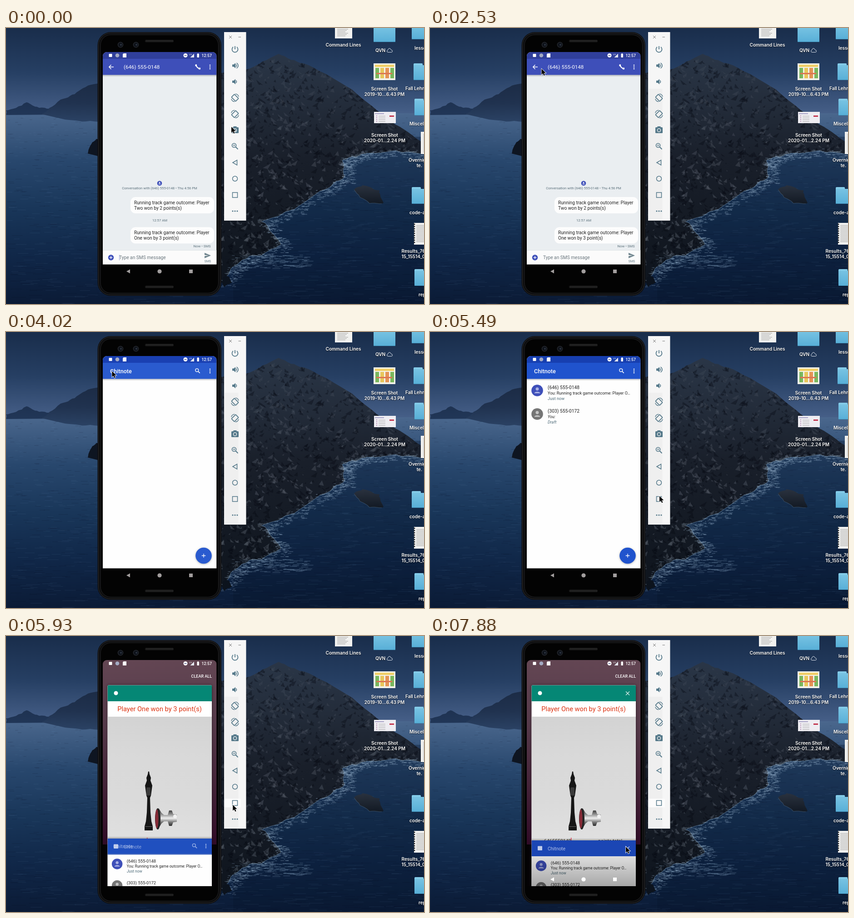
An HTML page with a canvas for the animation above (8 s loop, 920 by 609 pixels).

```html
<!DOCTYPE html>
<html lang="en">
<head>
<meta charset="utf-8">
<title>Phone on a desktop</title>
<style>
html, body { margin: 0; width: 100%; height: 100%; overflow: hidden; background: #0c1f3c; }
canvas { display: block; }
</style>
</head>
<body>
<canvas id="stage" width="920" height="609"></canvas>
<script>
const W = 920, H = 609, LOOP = 8000;
const PHONE_A = '(646) 555-0148', PHONE_B = '(303) 555-0172', APP = 'Chitnote';
const ROBOTO = 'Roboto, sans-serif', LABEL = 'Inter, sans-serif';
const stage = document.getElementById('stage').getContext('2d');
let c = stage;

// ---------- drawing helpers ----------
function rect(x, y, w, h, fill) { c.fillStyle = fill; c.fillRect(x, y, w, h); }
function round(x, y, w, h, r, fill) {
  c.beginPath(); c.roundRect(x, y, w, h, r); c.fillStyle = fill; c.fill();
}
function frame(x, y, w, h, r, color, width = 1) {
  c.beginPath(); c.roundRect(x, y, w, h, r); c.strokeStyle = color; c.lineWidth = width; c.stroke();
}
function disc(x, y, r, fill) { oval(x, y, r, r, fill); }
function oval(x, y, rx, ry, fill) {
  c.beginPath(); c.ellipse(x, y, rx, ry, 0, 0, 7); c.fillStyle = fill; c.fill();
}
function trace(points, closed) {
  c.beginPath();
  for (const [x, y] of points) c.lineTo(x, y);
  if (closed) c.closePath();
}
function poly(points, fill) { trace(points, true); c.fillStyle = fill; c.fill(); }
function line(points, color, width = 1, closed = false) {
  trace(points, closed); c.strokeStyle = color; c.lineWidth = width; c.stroke();
}
function ring(x, y, r, color, width = 1, from = 0, to = 2 * Math.PI) {
  c.beginPath(); c.arc(x, y, r, from, to); c.strokeStyle = color; c.lineWidth = width; c.stroke();
}
function cross(x, y, r, color, width = 1) {
  line([[x - r, y - r], [x + r, y + r]], color, width);
  line([[x + r, y - r], [x - r, y + r]], color, width);
}
function plus(x, y, r, color, width = 1.3) {
  line([[x - r, y], [x + r, y]], color, width);
  line([[x, y - r], [x, y + r]], color, width);
}
function text(s, x, y, size, fill, { align = 'left', font = ROBOTO, style = '' } = {}) {
  c.font = `${style} ${size}px ${font}`;
  c.textAlign = align; c.fillStyle = fill; c.fillText(s, x, y);
}
function fade(y0, y1, ...stops) {
  const g = c.createLinearGradient(0, y0, 0, y1);
  stops.forEach((s, i) => g.addColorStop(i / (stops.length - 1), s));
  return g;
}
function shadowed(color, blur, dy, draw) {
  c.save();
  c.shadowColor = color; c.shadowBlur = blur; c.shadowOffsetY = dy;
  draw();
  c.restore();
}
function clipped(x, y, w, h, r, draw) {
  c.save(); c.beginPath(); c.roundRect(x, y, w, h, r); c.clip(); draw(); c.restore();
}

// ---------- landscape ----------
let seed = 71;
function rnd(from = 0, to = 1) {
  seed = (seed * 16807) % 2147483647;
  return from + (to - from) * seed / 2147483647;
}
// Splits every edge and nudges the middle, for a natural outline.
function rough(points, amount, depth = 3) {
  if (!depth) return points;
  const out = [points[0]];
  for (let i = 1; i < points.length; i++) {
    const [[x0, y0], [x1, y1]] = [points[i - 1], points[i]];
    out.push([(x0 + x1) / 2 + rnd(-amount, amount), (y0 + y1) / 2 + rnd(-amount, amount)], points[i]);
  }
  return rough(out, amount / 2, depth - 1);
}
function hill(points, ...colors) {
  poly(rough(points, 4), fade(125, 205, ...colors));
}
function wallpaper() {
  rect(0, 0, W, 195, fade(0, 195, '#192d4b', '#263f63', '#48618a'));
  rect(0, 188, W, H - 188, fade(188, H, '#4a678d', '#28476d', '#193659', '#102748', '#0b1b36'));
  rect(500, 240, 420, 369, 'rgba(7,20,45,.35)');
  for (let i = 0; i < 1800; i++) {
    const y = rnd(195, H), length = rnd(1, 2) * (3 + (y - 180) / 30);
    rect(rnd(0, W), y, length, 1, rnd() < .5 ? 'rgba(120,155,195,.1)' : 'rgba(2,10,28,.16)');
  }
  hill([[0, 192], [0, 182], [45, 164], [85, 176], [118, 191]], '#1b2d49', '#22385a');
  hill([[78, 190], [120, 158], [160, 139], [205, 122], [205, 207], [130, 202]], '#1c2c46', '#20324f', '#2a4163');
  poly(rough([[180, 277], [190, 252], [204, 242], [204, 283]], 3), '#0e1521');

  const ridge = rough([[460, 100], [528, 92], [600, 57], [655, 78], [762, 136], [850, 208], [920, 256]], 5);
  const shore = rough([[920, 279], [795, 276], [742, 291], [746, 327], [690, 361], [563, 427], [606, 477], [520, 512], [480, 560]], 9);
  c.save();
  trace([...ridge, ...shore, [460, 560]], true);
  c.fillStyle = fade(55, 520, '#2a3647', '#232c3a', '#191f2a', '#151b25', '#10161f');
  c.fill();
  c.clip();
  for (let i = 0; i < 2200; i++) {
    const x = rnd(470, W), y = rnd(65, 560), size = rnd(2, 13), lean = rnd(-size, size);
    const rocky = Math.min(.34, .06 + y / 1300);
    poly([[x, y], [x + lean + size * .4, y + size], [x + lean - size * .5, y + size * .8]],
      rnd() < .62 ? 'rgba(4,8,15,.34)' : `rgba(104,111,124,${rocky})`);
  }
  c.restore();

  // surf along the shore
  c.lineJoin = 'round';
  line(shore, 'rgba(125,158,190,.35)', 2);
  for (const [x, y] of shore) {
    for (let j = 0; j < 14; j++) rect(x + rnd(-9, 22), y + rnd(-5, 11), rnd(2, 9), 1.3, 'rgba(160,188,212,.33)');
  }
  for (let i = 0; i < 110; i++) rect(rnd(495, 660), rnd(500, 530), rnd(5, 19), 1.4, 'rgba(150,182,210,.25)');
  const rock = rough([[766, 357], [785, 347], [822, 358], [831, 386], [800, 387], [766, 357]], 4);
  poly(rock, fade(345, 390, '#2b3340', '#111822'));
  line(rock.slice(-16), 'rgba(110,140,170,.3)', 1.2);
  poly(rough([[474, 560], [483, 545], [497, 562], [480, 571]], 3), '#0c131d');
}

// ---------- desktop ----------
function folder(x, y, w = 48, h = 37) {
  round(x, y, w * .42, 8, 2, '#83cbe8');
  round(x, y + 4, w, h - 4, 2, fade(y, y + h, '#7bc5e4', '#58afd7'));
  rect(x, y + h - 1, w, 1, '#3f8db5');
}
function page(x, y, w, h) {
  rect(x, y, w, h, '#f1f1ef');
  for (let i = 5; i < h - 4; i += 3) rect(x + 5, y + i, w - 12 - (i * 7) % 9, 1, '#a2a2a2');
}
function label(x, y, align, ...lines) {
  shadowed('rgba(0,0,0,.8)', 2, 1, () => lines.forEach((s, i) =>
    text(s, x, y + i * 12.4, 10, '#fff', { align, font: LABEL, style: '600' })));
}
function desktopIcons() {
  page(724, -6, 38, 29);
  label(742.5, 41, 'center', 'Command Lines');

  folder(809, -6);
  label(824, 53, 'center', 'QVN');
  c.beginPath();
  c.arc(841, 51, 2.5, 1.6, 4.6); c.arc(844, 48, 3, 3.5, 6); c.arc(848, 51, 2.5, 4.6, 7.8); c.closePath();
  c.strokeStyle = '#dce3ec'; c.lineWidth = 1; c.stroke();

  rect(809, 78, 48, 37, '#f3f2e8');
  rect(812, 81, 42, 5, '#f1cf67');
  ['#79b75d', '#e8c65b', '#e49455', '#79b75d'].forEach((color, i) => rect(813 + i * 11, 88, 8, 23, color));
  rect(815, 99, 35, 3, '#dc7553');
  label(833, 138, 'center', 'Screen Shot', '2019-10...6.43 PM');

  rect(810, 185, 48, 25, '#eeedf2');
  rect(812, 188, 20, 2, '#a7a2c6');
  rect(844, 193, 10, 3, '#c33850');
  for (let y = 194; y < 208; y += 4) { disc(816, y, 1, '#a774a5'); rect(820, y, 15, 1, '#aaa'); }
  label(833.5, 239.5, 'center', 'Screen Shot', '2020-01...2.24 PM');

  folder(893, -12); label(899, 48, 'left', 'lessons');
  folder(897, 78); label(879, 137, 'left', 'Fall Lehman');
  folder(899, 156); label(888, 215, 'left', 'Miscellany');
  page(913, 229, 40, 49); label(886, 294.5, 'left', 'Overnight', '       te.');
  folder(893, 351); label(888, 411, 'left', 'code-a');
  page(898, 430, 40, 48); label(870.5, 495.5, 'left', 'Results_76', '15_15514_0');
  for (let y = 433; y < 476; y += 5) disc(899, y, 1.5, '#222');
  folder(899, 532); label(908, 592, 'left', 'rep');
}

// ---------- emulator frame ----------
function phoneBody() {
  round(201.5, 9, 272.5, 582, 29, '#0d0d0e');
  frame(203.5, 11, 268.5, 578, 27, '#2c2d30');
  round(208, 15, 259.5, 570, 23, '#030303');
  frame(208, 15, 259.5, 570, 23, '#232426');
  for (const y of [26, 568.5]) {
    round(306, y, 63, 5.5, 2.5, '#191919');
    for (let x = 309; x < 367; x += 3) rect(x, y + 1, 1, 3, '#303030');
  }
  for (const x of [252, 286]) {
    disc(x, 37, 6.5, '#202329'); disc(x, 37, 4.5, '#0c1017'); disc(x + 1, 37, 2, '#2c3340');
  }
}

const INK = '#55798a';
function speaker(y, waves) {
  rect(498, y - 2.5, 4, 5, INK);
  poly([[500, y - 1], [505, y - 6], [505, y + 6], [500, y + 1]], INK);
  for (let i = 0; i < waves; i++) ring(504.5, y, 3 + i * 3.5, INK, 1.6, -1.1, 1.1);
}
function rotateIcon(y, flip) {
  c.save(); c.translate(504, y); c.scale(flip, 1);
  ring(0, 0, 8.6, INK, 1.4, -1.5, -.3);
  ring(0, 0, 8.6, INK, 1.4, 1.64, 2.84);
  c.rotate(Math.PI / 4);
  frame(-6.5, -4.5, 13, 9, 1, INK, 1.8);
  c.restore();
}
function toolbar(t) {
  rect(480, 9, 48.5, 416, '#f6f6f6');
  if (t >= 1950) rect(481, 134, 30.5, 291, '#efefef');
  if (t >= 5790) rect(482, 359, 35, 19, '#fcfcfc');
  cross(494, 20, 3, '#777');
  line([[511.5, 20], [517, 20]], '#777');
  ring(504, 47, 6.5, INK, 1.8, -.9, 4.05);
  line([[504, 40], [504, 47]], INK, 1.8);
  speaker(83, 2); speaker(118.5, 1);
  rotateIcon(154, 1); rotateIcon(190, -1);
  round(496, 219, 16, 13, 1.5, INK);
  rect(500.5, 217, 7, 3, INK);
  ring(504, 225.5, 3.6, '#f2f2f2', 1.4);
  ring(502, 259, 4.5, INK, 1.7);
  line([[505.5, 262.5], [510.5, 267.5]], INK, 2);
  plus(502, 259, 2.3, INK, 1);
  line([[499, 297], [508.5, 291.5], [508.5, 302.5]], INK, 1.5, true);
  ring(504, 332.5, 5.5, INK, 1.5);
  frame(498.5, 363, 11, 11, 0, INK, 1.5);
  for (const x of [499, 504, 509]) disc(x, 404, 1.6, INK);
}

// ---------- phone screens ----------
function statusBar() {
  round(226.5, 57, 7, 7, 1, '#fff');
  disc(245, 60.5, 4.3, '#a3aac3');
  round(257, 56, 8, 9, [3, 0, 0, 0], '#fff');
  disc(395, 60.5, 4.5, '#fff'); rect(392.5, 60, 5, 1.2, '#333c78');
  text('LTE', 403, 59.5, 4, '#fff');
  poly([[405.5, 65], [414, 56.5], [414, 65]], '#e4e7f0');
  round(420.5, 57, 4.5, 8, .7, '#fff'); rect(421.7, 56, 2, 1.5, '#fff');
  text('12:57', 453, 64, 8.9, '#fff', { align: 'right', style: '500' });
}
function navIcons(color) {
  poly([[265, 537], [273, 532.5], [273, 541.5]], color);
  disc(338, 537, 4.6, color);
  rect(403, 533, 8, 8, color);
}
function dots(x, y, color, gap = 4) {
  for (const d of [-gap, 0, gap]) disc(x, y + d, 1.3, color);
}
function searchIcon(x, y, color) {
  ring(x - 1.2, y - 1.2, 3.4, color, 1.4);
  line([[x + 1.5, y + 1.5], [x + 5.2, y + 5.2]], color, 1.7);
}
function person(x, y, r, color, ink) {
  disc(x, y, r, color);
  disc(x, y - r * .25, r * .27, ink);
  c.beginPath(); c.ellipse(x, y + r * .48, r * .5, r * .27, 0, Math.PI, 0); c.fillStyle = ink; c.fill();
}
function bars(top, main) {
  rect(213, 53, 250.5, 15, top);
  rect(213, 68, 250.5, 35.5, main);
  rect(213, 103.5, 250.5, 4, fade(103, 108, 'rgba(0,0,0,.25)', 'rgba(0,0,0,0)'));
}
function bubble(y, a, b) {
  round(274, y, 184, 36, 11, '#fdfdfd');
  text(a, 282, y + 15.5, 10.17, '#212121');
  text(b, 282, y + 27.7, 10.17, '#212121');
}
function conversation(t) {
  rect(213, 53, 250.5, 468.5, '#eaeef1');
  bars('#303f9b', '#3e4fb9');
  line([[237, 86], [227, 86]], '#fff', 1.5);
  line([[231.5, 81.3], [226.8, 86], [231.5, 90.7]], '#fff', 1.5);
  text(PHONE_A, 259, 90.3, 11.6, '#fff');
  ring(428, 80, 9.8, '#fff', 2.2, 1.6, 3.1);
  round(416.5, 80.5, 3.5, 4, .8, '#fff'); round(424, 87.5, 4, 4, .8, '#fff');
  dots(449, 86, '#fff');

  const note = '#5a6f7a';
  person(338, 342.5, 5.3, '#3e4fb9', '#fff');
  text(`Conversation with ${PHONE_A} • Thu 4:56 PM`, 338, 355.5, 7.7, note, { align: 'center' });
  bubble(373, 'Running track game outcome: Player', 'Two won by 2 points(s)');
  text('12:57 AM', 338.5, 427, 7.75, note, { align: 'center' });
  bubble(439.5, 'Running track game outcome: Player', 'One won by 3 point(s)');
  text('Now • SMS', 450.5, 483.5, 7.7, note, { align: 'right' });

  rect(213, 490.5, 250.5, 31, '#fbfbfb');
  rect(213, 490, 250.5, 1, '#dfe3e5');
  disc(231, 506.5, 6.2, '#3e4fb9');
  plus(231, 506.5, 3.3, '#fff');
  text('Type an SMS message', 249, 510.3, 10.17, '#68757c');
  if (t % 1000 < 500) rect(249, 500.5, 1, 12, '#9aa5d8');
  poly([[437, 496], [451, 502], [437, 508], [437, 503.3], [446, 502], [437, 500.7]], '#71868f');
  text('SMS', 444, 516.5, 7, '#5c7580', { align: 'center' });
}
function row(y, avatar, ink, title, body, status, style) {
  person(236, y, 12.8, avatar, ink);
  text(title, 259, y - 3.3, 10.25, '#212121');
  text(body, 259, y + 9, 9.07, '#212121', { style });
  text(status, 259, y + 21.2, 9.1, '#4c6a78', { style });
}
function rows() {
  row(129, '#3e4fb9', '#a9b1e4', PHONE_A, 'You: Running track game outcome: Player O…', 'Just now', '');
  row(181, '#757575', '#c4c4c4', PHONE_B, 'You:', 'Draft', 'italic');
}
function inbox(t) {
  const settled = t >= 4160, main = settled ? '#2053cd' : '#2a5bcf';
  rect(213, 53, 250.5, 468.5, '#fefefe');
  bars(settled ? '#173fb0' : '#1a40b2', main);
  text(APP, 229, 91, 12.6, '#fff', { style: '500' });
  searchIcon(421.5, 85.5, '#fff');
  dots(449, 86, '#fff');
  if (t >= 4310) rows();
  shadowed('rgba(0,0,0,.3)', 4, 1, () => disc(435, 493.5, 17.8, main));
  plus(435, 493.5, 4.3, '#fff');
}

// ---------- overview of open apps ----------
// A turned piece: [distance along the axis, radius] mirrored about the axis.
function turned(x, y, angle, profile, fill) {
  c.save(); c.translate(x, y); c.rotate(angle);
  poly([...profile, ...profile.map(([d, r]) => [d, -r]).reverse()], fill);
  c.restore();
}
function chessPhoto() {
  rect(223.5, 178, 230, 274, fade(178, 450, '#d3d3d3', '#d9d9d9', '#dadada', '#e0e0e0'));
  turned(314, 299, Math.PI / 2, [[0, 1], [6, 2], [14, 5], [20, 4], [31, 8], [53, 5], [58, 3], [90, 4], [110, 6], [121, 9], [130, 9]], '#161616');
  round(309, 334, 9, 18, 2, '#3a3a3a');
  rect(306, 420, 16, 1, '#666');
  turned(336, 402, 0, [[0, 22], [6, 12], [12, 7], [20, 7], [23, 17], [29, 17], [32, 9], [40, 8]], fade(-18, 18, '#333', '#8b8b8b', '#eee', '#777', '#222'));
  oval(334, 403.5, 6, 23.5, '#242424');
  oval(332, 403.5, 3.5, 21, '#862b37');
  disc(372, 398, 4, '#f2f2f2');
}
function inboxCard(y, settled, closable) {
  const scale = .918;
  rect(223.5, y - 5, 230, 5, fade(y - 5, y, 'rgba(0,0,0,0)', 'rgba(0,0,0,.25)'));
  rect(223.5, y, 230, 35, settled ? '#1b46b4' : '#2050bf');
  rect(223.5, y + 35, 230, 552, '#fefefe');
  c.save();
  c.translate(223.5 - 213 * scale, y - 68 * scale); c.scale(scale, scale);
  rows();
  c.restore();
  round(237, y + 12.5, 10, 9.5, 1, '#bfcbea');
  text(APP, 259, y + 21.5, 10.4, settled ? '#b5c3e8' : '#8ea6dd');
  if (settled) {
    rect(223.5, 486, 230, 66, fade(486, 552, 'rgba(0,0,0,.13)', 'rgba(0,0,0,.34)'));
  } else {
    rect(223.5, y + 33, 230, 3, 'rgba(90,120,190,.5)');
    text(APP, 236, y + 21, 11.5, 'rgba(210,221,246,.55)', { style: '500' });
    searchIcon(415, y + 16, '#9cb3e6');
    dots(440, y + 16.5, '#9cb3e6', 3.6);
  }
  if (closable) cross(435, y + 17.5, 4, '#c5d0ed', 1.2);
}
function overview(t) {
  const settled = t >= 6080, closable = t >= 7130;
  const y = t < 5930 ? 265 : settled ? 451 : 447;
  rect(213, 53, 250.5, 407, fade(53, 460, '#634653', '#573b4b', '#46253a', '#310b27'));
  rect(213, 460, 250.5, 92, '#050305');
  text('CLEAR ALL', 453, 92, 9, '#fff', { align: 'right', style: '500' });
  shadowed('rgba(0,0,0,.5)', 6, 0, () => round(223.5, 108.5, 229.5, 443.5, [2, 2, 0, 0], '#fff'));
  clipped(223.5, 108.5, 229.5, 443.5, [2, 2, 0, 0], () => {
    rect(223.5, 108.5, 230, 35.5, '#058775');
    disc(242, 126, 4.5, '#fff');
    if (closable) cross(435, 126.5, 4, '#d8eeea', 1.2);
    text('Player One won by 3 point(s)', 338, 165.7, 14.65, '#dd3311', { align: 'center' });
    chessPhoto();
    text('6465550148', 251, 456, 10.6, '#333');
    text('points total', 370, 456, 10.6, '#333');
    rect(310, 445, 1.3, 8, '#e52a45');
    inboxCard(y, settled, closable);
  });
  if (settled) navIcons('#fff');
}

// ---------- pointer ----------
const HOME = { x: 496, y: 218 };
const MOVES = [
  { from: 0, to: 1500, x: 498, y: 195 },
  { from: 1800, to: 2980, x: 231, y: 84 },
  { from: 4020, to: 5060, x: 505, y: 362 },
  { from: 5930, to: 6830, x: 445, y: 470 },
  { from: 6830, to: 7280, x: 404, y: 460 },
  { from: 7280, to: 7880, x: 431, y: 465 }
];
const easeOut = k => 1 - (1 - k) ** 3;
function pointer(t) {
  let { x, y } = HOME;
  for (const move of MOVES) {
    const k = easeOut(Math.min(1, Math.max(0, (t - move.from) / (move.to - move.from))));
    x += (move.x - x) * k;
    y += (move.y - y) * k;
  }
  c.save();
  c.translate(x, y);
  const arrow = [[0, 0], [0, 13], [3, 10.2], [5.3, 15], [7.5, 14], [5.2, 9.4], [9.4, 9.2]];
  line(arrow, '#fff', 1.6, true);
  poly(arrow, '#050505');
  c.restore();
}

// ---------- timeline ----------
const backdrop = document.createElement('canvas');
backdrop.width = W; backdrop.height = H;
c = backdrop.getContext('2d');
wallpaper();
desktopIcons();
phoneBody();
c = stage;

function screen(t) {
  if (t >= 5790) {
    overview(t);
  } else {
    navIcons('#a29e9e');
    if (t < 4020) conversation(t);
    if (t >= 3870) {
      c.globalAlpha = t < 4020 ? .6 : 1;
      inbox(t);
      c.globalAlpha = 1;
    }
  }
  statusBar();
}

const STEP = 149; // the pointer is seen in steps, not continuously
function render(t) {
  c.drawImage(backdrop, 0, 0);
  toolbar(t);
  clipped(213, 53, 250.5, 499, [9, 9, 0, 0], () => screen(t));
  pointer(Math.floor((t + 30) / STEP) * STEP);
}

const start = performance.now();
function tick() {
  render((performance.now() - start) % LOOP);
  requestAnimationFrame(tick);
}
tick();
</script>
</body>
</html>
```
